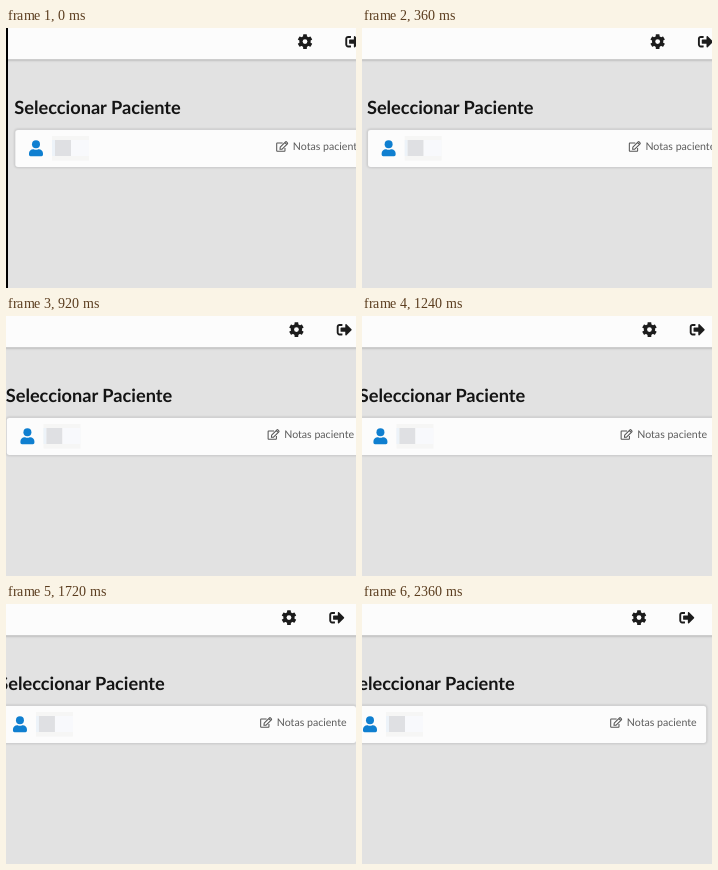
Recreate the animation shown at these times as an HTML page. Size 350 px wide and 260 px high, loop 2.8 s.

```html
<!DOCTYPE html>
<html lang="es">
<head>
<meta charset="utf-8">
<title>Seleccionar Paciente</title>
<style>
  html, body { margin: 0; width: 100%; height: 100%; overflow: hidden; background: #e2e2e2; }
  svg { display: block; }
  text { font-family: Lato, sans-serif; text-rendering: geometricPrecision; }
  .bar { filter: drop-shadow(0 1px 1px rgba(0, 0, 0, .25)); }
  .card { filter: drop-shadow(0 .8px .8px rgba(0, 0, 0, .2)); }
</style>
</head>
<body>
<svg width="350" height="260" viewBox="0 0 350 260">
  <rect width="350" height="260" fill="#e2e2e2"/>
  <g id="page">
    <rect class="bar" x="-30" width="430" height="31.3" fill="#fcfcfc"/>

    <!-- settings -->
    <g transform="translate(291.4 6) scale(.0297)" fill="#1c1c1c">
      <circle cx="256" cy="256" r="190"/>
      <rect id="teeth" x="192" y="9" width="128" height="494" rx="14"/>
      <use href="#teeth" transform="rotate(60 256 256)"/>
      <use href="#teeth" transform="rotate(120 256 256)"/>
      <circle cx="256" cy="256" r="80" fill="#fcfcfc"/>
    </g>

    <!-- sign out -->
    <path transform="translate(339.3 6.1) scale(.0297)" fill="#1c1c1c" d="M497 273L329 441c-15 15-41 4.5-41-17v-96H152c-13 0-24-11-24-24v-96c0-13 11-24 24-24h136V88c0-21 26-32 41-17l168 168c9 9 9 25 0 34z
      M192 436v-40c0-7-5-12-12-12H96c-18 0-32-14-32-32V160c0-18 14-32 32-32h84c7 0 12-5 12-12V76c0-7-5-12-12-12H96c-53 0-96 43-96 96v192c0 53 43 96 96 96h84c7 0 12-5 12-12z"/>

    <text x="8.3" y="86.3" font-size="18.2" font-weight="700" fill="#141414">Seleccionar Paciente</text>

    <rect class="card" x="8.8" y="101.3" width="357.9" height="38.2" rx="3" fill="#d4d4d5"/>
    <rect x="9.4" y="101.9" width="356.7" height="37" rx="2.6" fill="#fcfcfc"/>

    <!-- user -->
    <g transform="translate(23 112.2) scale(.0312)" fill="#0f7fd0">
      <circle cx="224" cy="128" r="128"/>
      <path d="M314 288h-17a174 174 0 0 1-146 0h-17A134 134 0 0 0 0 422v42a48 48 0 0 0 48 48h352a48 48 0 0 0 48-48v-42a134 134 0 0 0-134-134z"/>
    </g>

    <!-- obscured name -->
    <rect x="46" y="108" width="37" height="24.5" fill="#f6f6f5"/>
    <rect x="46" y="112" width="3" height="16" fill="#edf3f9"/>
    <rect x="49" y="112" width="16" height="16" fill="#dfe0e3"/>
    <rect x="65" y="112" width="18" height="16" fill="#f8f9fc"/>

    <!-- edit -->
    <path transform="translate(270.2 113.2) scale(.0207)" fill="none" stroke="#555" stroke-width="50" stroke-linejoin="round" d="M311 88H48Q24 88 24 112V464Q24 488 48 488H400Q424 488 424 464V326
      M194 290L450 34q24-24 49 0l43 43q24 24 0 49L286 383l-102 11zM419 66l91 91"/>
    <text x="286.8" y="122.3" font-size="10.6" fill="#5c5c5c">Notas paciente</text>

    <rect x="-30" width="32" height="260" fill="#000"/>
  </g>
</svg>
<script>
  const LOOP = 2800, PAN = 2360, STEP = 40, DISTANCE = 22;
  const page = document.getElementById('page');
  const start = performance.now();

  function draw(now) {
    const t = Math.max(0, now - start) % LOOP;
    const panned = Math.min(Math.floor(t / STEP) * STEP, PAN);
    page.setAttribute('transform', `translate(${-DISTANCE * panned / PAN} 0)`);
    requestAnimationFrame(draw);
  }
  draw(start);
</script>
</body>
</html>
```
